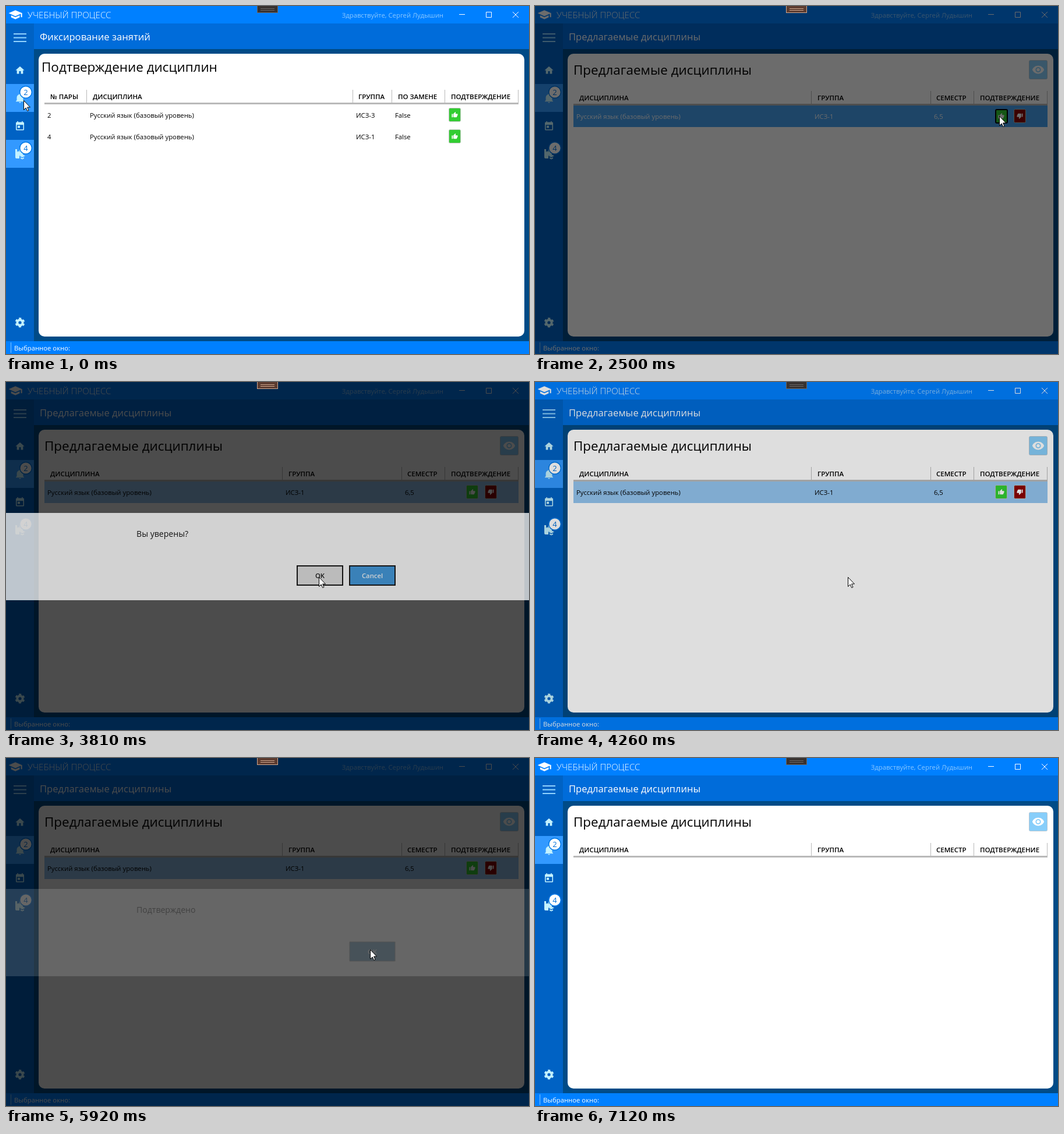
An HTML page that plays this animation: 898 by 598 pixels, repeating every 7.61 s.

```html
<!DOCTYPE html>
<html lang="ru">
<head>
<meta charset="utf-8">
<style>
html, body { margin: 0; width: 100%; height: 100%; overflow: hidden; background: #004b87; }
svg { display: block; font-family: "Open Sans", "Noto Sans", sans-serif; font-size: 11.3px; }
.head { font-size: 11.5px; font-weight: 600; }
.title { font-size: 22.45px; }
.bar { font-size: 16.6px; fill: #fff; }
.msg { font-size: 14.1px; }
.icon { fill: #c4f2ff; }
.white { fill: #fff; }
.line { fill: none; stroke: #fff; }
.mid { text-anchor: middle; }
</style>
</head>
<body>
<svg id="stage" width="898" height="598" viewBox="0 0 898 598"></svg>
<script>
const LOOP = 7610;
const stage = document.getElementById('stage');

const text = (x, y, s, attrs = '') => `<text x="${x}" y="${y}" ${attrs}>${s}</text>`;
const rect = (x, y, w, h, fill, attrs = '') =>
  `<rect x="${x}" y="${y}" width="${w}" height="${h}" fill="${fill}" ${attrs}/>`;
// 24-unit icon centred on a point
const icon = (x, y, scale, d, cls = 'icon', turn = 0) =>
  `<path class="${cls}" fill-rule="evenodd" transform="translate(${x} ${y}) rotate(${turn}) scale(${scale}) translate(-12 -12)" d="${d}"/>`;

const HOME = 'M10 20V14H14V20H19V12H22L12 3L2 12H5V20Z';
const BELL = 'M21 19V20H3V19L5 17V11C5 7.9 7 5.2 10 4.3V4A2 2 0 0 1 14 4V4.3C17 5.2 19 7.9 19 11V17ZM14 21A2 2 0 0 1 10 21Z';
const CALENDAR = 'M7 11H12V16H7ZM19 19V9H5V19ZM19 3H18V1H16V3H8V1H6V3H5A2 2 0 0 0 3 5V19A2 2 0 0 0 5 21H19A2 2 0 0 0 21 19V5A2 2 0 0 0 19 3Z';
const CAP = 'M12 3L1 9L12 15L21 10.1V17H23V9ZM5 13.2V17.2L12 21L19 17.2V13.2L12 17Z';
const THUMB = 'M23 10A2 2 0 0 0 21 8H14.7L15.7 3.4Q15.8 2.6 15.2 2L14.2 1L7.6 7.6Q7 8.2 7 9V19A2 2 0 0 0 9 21H18Q19.3 21 19.8 19.8L22.9 12.7Q23 12.4 23 12ZM1 21H5V9H1Z';
const EYE = 'M12 9A3 3 0 1 0 12 15A3 3 0 1 0 12 9M12 17A5 5 0 1 1 12 7A5 5 0 1 1 12 17M12 4.5C7 4.5 2.7 7.6 1 12C2.7 16.4 7 19.5 12 19.5C17 19.5 21.3 16.4 23 12C21.3 7.6 17 4.5 12 4.5Z';

const badge = (y, n) =>
  `<circle cx="34" cy="${y}" r="10.3" fill="#fff" stroke="#0078e6" stroke-width="1.4"/>` +
  text(34, y + 4.7, n, 'class="mid" fill="#0070d8" style="font-size:13px"');

const thumbButton = (x, y, fill, turn = 0) =>
  rect(x + .5, y + .5, 20, 23, fill, 'rx="2" stroke="#b9c4b9"') +
  icon(x + 10.5, y + 12, .46, THUMB, 'white', turn);

// Table header: labels as [x, text], column rules and the thick bottom line
const header = (y, labels, rules) =>
  labels.map(([x, s]) => text(x, y, s, 'class="head"')).join('') +
  rules.map(x => rect(x, y - 16, 1, 23, '#b9b9b9')).join('') +
  rect(66, y + 6, 814, 3, '#b9b9b9');

const lesson = (y, number, group) =>
  text(71, y, number) + text(144, y, 'Русский язык (базовый уровень)') +
  text(601, y, group) + text(668, y, 'False') + thumbButton(760, y - 17, '#32cd32');

const button = (x, label, fill, color, attrs) =>
  rect(x + 1, 316, 78, 33, fill, `stroke-width="2" ${attrs}`) +
  text(x + 40, 337, label, `class="mid" fill="${color}" style="font-weight:600"`);

const frame =
  rect(0, 0, 898, 598, '#004b87') +
  rect(0, 0, 898, 30, '#0080ff') + rect(0, 576, 898, 22, '#0080ff') +
  rect(0, 30, 48, 546, '#0062c4') + rect(48, 30, 850, 44, '#006cda') +
  `<path class="white" transform="translate(3.5 4.6) scale(1.05 .86)" d="${CAP}"/>` +
  text(37, 21, 'УЧЕБНЫЙ ПРОЦЕСС', 'class="white" style="font-size:15.15px;font-weight:300"') +
  text(751, 20, 'Здравствуйте, Сергей Лудышин', 'fill="#8cc8ff" text-anchor="end"') +
  '<path class="line" d="M778 14.5h10M824.5 10.5h9v9h-9zM870 10l10 10M880 10l-10 10"/>' +
  '<path d="M13 48h22M13 54.5h22M13 61h22" stroke="#93d4ff" stroke-width="2"/>' +
  rect(0, 134, 48, 48, '#3399ff') + rect(0, 230, 48, 48, '#3399ff', 'id="chosen"') +
  icon(24, 110.5, .76, HOME) + icon(24, 158, .78, BELL) + icon(24, 206.5, .78, CALENDAR) +
  '<path class="icon" d="M16 246h3v5l2-2 2 2v-5h6v9l-6 2v5h-5a2 2 0 0 1-2-2zM28 255l5 2.5-5 2.5-5-2.5zM25 260l3 1.5 3-1.5v2l-3 1.5-3-1.5z"/>' +
  '<g fill="none" stroke="#c4f2ff"><circle cx="24" cy="544" r="4.6" stroke-width="4"/>' +
  '<circle cx="24" cy="544" r="7.2" stroke-width="2.4" stroke-dasharray="4 3.54" stroke-dashoffset="2" transform="rotate(30 24 544)"/></g>' +
  badge(148, 2) + badge(244, 4) +
  rect(8, 578, 1, 18, '#8cc8ff') +
  text(14, 592, 'Выбранное окно:', 'class="white"') +
  rect(56, 82, 834, 486, '#fff', 'rx="10"') +
  text(58, 59, '', 'class="bar" id="caption"');

const pageA =
  text(61, 113, 'Подтверждение дисциплин', 'class="title"') +
  header(160, [[76, '№ ПАРЫ'], [149, 'ДИСЦИПЛИНА'], [605, 'ГРУППА'], [673, 'ПО ЗАМЕНЕ'], [764, 'ПОДТВЕРЖДЕНИЕ']],
    [138, 595, 662, 753, 879]) +
  lesson(192, 2, 'ИСЗ-3') + lesson(229, 4, 'ИСЗ-1');

const pageB =
  text(66, 118, 'Предлагаемые дисциплины', 'class="title"') +
  rect(848.5, 93.5, 31, 32, '#87cefa', 'rx="2" stroke="#b4c6d2"') + icon(864, 109.5, .92, EYE, 'white') +
  header(162, [[76, 'ДИСЦИПЛИНА'], [485, 'ГРУППА'], [689, 'СЕМЕСТР'], [764, 'ПОДТВЕРЖДЕНИЕ']],
    [474, 679, 753, 879]) +
  '<g id="row">' + rect(66, 171, 814, 37, '#fff', 'id="rowBack"') +
  '<g id="rowText">' + text(71, 194, 'Русский язык (базовый уровень)') + text(480, 194, 'ИСЗ-1') + text(685, 194, '6,5') + '</g>' +
  thumbButton(790, 177, '#32cd32') + thumbButton(822, 177, '#8b0000', 180) +
  rect(791, 178, 20, 23, 'none', 'id="focus" rx="2" stroke="#000" stroke-width="2"') + '</g>';

const dialog = (id, content) => `<g id="${id}">${rect(0, 225, 898, 150, '#fff')}${content}</g>`;

stage.innerHTML = frame +
  `<g id="pageA">${pageA}</g><g id="pageB">${pageB}</g>` +
  rect(0, 0, 898, 598, '#000', 'id="shade"') +
  '<g id="tool"><rect x="431.5" y="-1" width="35" height="12.5"/><path d="M437 4.5h24M437 7.5h24"/></g>' +
  dialog('ask', text(224, 266, 'Вы уверены?', 'class="msg"') +
    button(499, 'OK', '#e0e0e0', '#000', 'stroke="#000"') +
    button(589, 'Cancel', '#3393dd', '#fff', 'stroke="#000"')) +
  dialog('done', text(224, 266, 'Подтверждено', 'class="msg"') +
    button(589, 'OK', '#2a78a8', '#fff', 'stroke="#777" stroke-dasharray="1 1"')) +
  '<path id="cursor" fill="#fff" stroke="#000" d="M.5 .5V16.5L4.2 13L6.7 18.5L9 17.5L6.6 12H11.5Z"/>';

const $ = id => document.getElementById(id);
const set = (id, attrs) => { for (const k in attrs) $(id).setAttribute(k, attrs[k]); };
const show = (id, on) => set(id, { display: on ? 'inline' : 'none' });
const ramp = (t, a, b) => Math.min(1, Math.max(0, (t - a) / (b - a)));
const pulse = (t, inA, inB, outA, outB) => ramp(t, inA, inB) - ramp(t, outA, outB);

// Pointer stops: time, x, y
const PATH = [
  [60, 30, 162], [180, 20, 157], [460, 20, 157], [1150, 583, 186], [1370, 829, 183],
  [1440, 804, 180], [1800, 797, 189], [2540, 797, 189], [2730, 715, 226], [3420, 537, 335],
  [5270, 537, 335], [5650, 625, 329], [6650, 625, 329], [7120, 675, 600]
];

function pointer(t) {
  const i = PATH.findIndex(p => p[0] > t);
  if (i === 0) return PATH[0].slice(1);
  if (i < 0) return PATH[PATH.length - 1].slice(1);
  const [ta, xa, ya] = PATH[i - 1], [tb, xb, yb] = PATH[i];
  const u = ramp(t, ta, tb), e = u * u * (3 - 2 * u);
  return [xa + (xb - xa) * e, ya + (yb - ya) * e];
}

function draw(t) {
  const [x, y] = pointer(t).map(Math.round);
  const swap = ramp(t, 400, 700);
  const shade = .7 * (pulse(t, 2254, 2554, 4016, 4316) + pulse(t, 4430, 4730, 6010, 6310));
  const picked = t >= 1970 && t < 2700;
  const hover = x > 66 && y >= 171 && y < 208 && t < 1970;
  const idle = t >= 2700;

  show('chosen', t < 400);
  $('caption').textContent = t < 400 ? 'Фиксирование занятий' : 'Предлагаемые дисциплины';
  set('pageA', { opacity: 1 - swap });
  set('pageB', { opacity: swap });

  show('row', t < 6080);
  set('rowBack', { fill: picked ? '#48a4f5' : hover ? '#66aeea' : idle ? '#93c4ef' : '#fff' });
  set('rowText', { fill: picked || hover ? '#fff' : '#000' });
  show('focus', picked);

  set('shade', { opacity: shade });
  const lit = shade > .3;
  set('tool', { fill: lit ? '#5c3b2f' : '#383230', stroke: lit ? '#d0a890' : '#6c6866' });

  set('ask', { opacity: pulse(t, 2590, 2790, 3760, 3960) });
  set('done', { opacity: pulse(t, 4740, 4940, 5750, 5950) });
  set('cursor', { transform: `translate(${x} ${y})` });
}

const start = performance.now();
function tick() {
  draw((performance.now() - start) % LOOP);
  requestAnimationFrame(tick);
}
tick();
</script>
</body>
</html>
```
